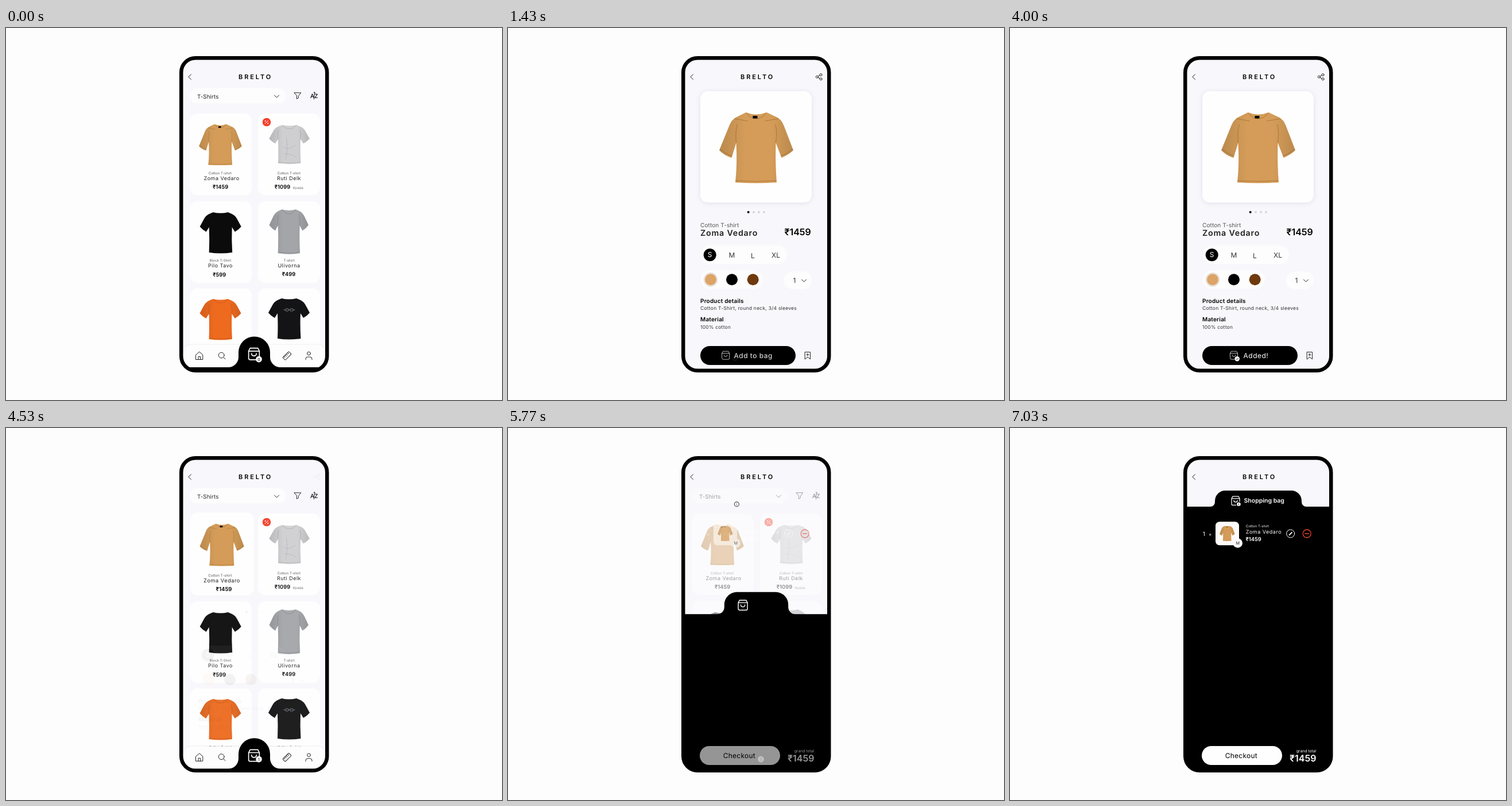
Recreate the animation shown at these times as an HTML page. Size 864 by 648 pixels, loop 8000 ms.

```html
<!DOCTYPE html>
<html lang="en">
<head>
<meta charset="utf-8">
<title>Shop app</title>
<style>
/* --d: product page, --a: added to bag, --b: bag sheet (all 0 to 1) */
@property --d { syntax: "<number>"; inherits: true; initial-value: 0; }
@property --a { syntax: "<number>"; inherits: true; initial-value: 0; }
@property --b { syntax: "<number>"; inherits: true; initial-value: 0; }

html, body { margin: 0; width: 100%; height: 100%; overflow: hidden; background: #fdfdfd; }
svg.stage {
  display: block; width: 100vw; height: 100vh;
  font-family: Inter, "Open Sans", sans-serif;
  text-rendering: geometricPrecision;
  animation: flow 8s linear infinite;
}
@keyframes flow {
  0% { --d: 0; --a: 0; --b: 0; }
  7% { --d: 0; animation-timing-function: linear(0, .097, .298, .514, .7, .839, .933, .989, 1.017, 1.027, 1.028, 1.023, 1.017, 1.011, 1.006, 1.003, 1); }
  17% { --d: 1; }
  17.5% { --a: 0; animation-timing-function: linear(0, .097, .298, .514, .7, .839, .933, .989, 1.017, 1.027, 1.028, 1.023, 1.017, 1.011, 1.006, 1.003, 1); }
  27.5% { --a: 1; }
  53.25% { --d: 1; animation-timing-function: cubic-bezier(.2, .7, .3, 1); }
  58.75% { --d: 0; }
  68.5% { --b: 0; animation-timing-function: ease-in-out; }
  75.1% { --b: 1; }
  100% { --d: 0; --a: 1; --b: 1; }
}

.list { opacity: calc((1 - var(--d)) * (1 - var(--b))); }
.hero { opacity: calc(1 - var(--b)); }
.page { opacity: var(--d); }
.bag { opacity: var(--b); }
.before { opacity: calc(1 - var(--a)); }
.after { opacity: var(--a); }
.nav { transform: translateY(calc(60px * var(--d))); }
.shift { transform: translateX(calc(11.5px * var(--a))); }

.move {
  --p: var(--d);
  transform:
    translate(calc((var(--x) + var(--dx) * var(--p)) * 1px), calc((var(--y) + var(--dy) * var(--p)) * 1px))
    scale(calc(var(--s) + var(--ds) * var(--p)));
}
.move.toBag { --p: var(--b); }

.tile {
  x: calc(320px + 15px * var(--d)); y: calc(149px - 39px * var(--d));
  width: calc(108px + 86px * var(--d)); height: calc(142px + 52px * var(--d));
  rx: 13px;
  filter: drop-shadow(0 1px 5px rgb(80 80 150 / calc(.14 * var(--d))));
}
.heroName { animation: weight 8s step-end infinite; }
@keyframes weight {
  0% { font-weight: 400; }
  7% { font-weight: 600; }
  53.25%, 100% { font-weight: 400; }
}
.sheet { animation: sheet 8s linear infinite; }
@keyframes sheet {
  0%, 68.5% {
    d: path("M300 591 H387 A18 18 0 0 0 405 573 V565 A27.5 27.5 0 0 1 432.5 537.5 H432.5 A27.5 27.5 0 0 1 460 565 V573 A18 18 0 0 0 478 591 H566 V800 H300 Z");
    animation-timing-function: ease-in-out;
  }
  75.1%, 100% {
    d: path("M300 137 H349 A8 8 0 0 0 357 129 V127 A18 18 0 0 1 375 109 H490 A18 18 0 0 1 508 127 V129 A8 8 0 0 0 516 137 H566 V800 H300 Z");
  }
}

.line { fill: none; stroke: #222; stroke-width: 1; stroke-linecap: round; stroke-linejoin: round; }
.white { stroke: #fff; }
.sub { font-size: 6px; letter-spacing: .05px; fill: #555; }
.name { font-size: 9px; letter-spacing: .5px; fill: #222; }
.price { font-size: 9.4px; font-weight: 600; fill: #000; }
.btn { font-size: 12px; letter-spacing: .5px; }
.head { font-size: 10px; font-weight: 600; letter-spacing: .2px; }
.note { font-size: 8.5px; letter-spacing: .25px; fill: #333; }
.size { font-size: 12px; fill: #333; text-anchor: middle; }
.mid { text-anchor: middle; }
.light text { fill: #fff; }
</style>
</head>
<body>
<svg class="stage" viewBox="0 0 864 648">
  <defs>
    <clipPath id="screen"><rect x="305.25" y="52.25" width="254" height="544.5" rx="25"/></clipPath>
    <linearGradient id="shade">
      <stop offset="0" stop-opacity=".12"/>
      <stop offset=".35" stop-opacity="0"/>
      <stop offset=".7" stop-opacity="0"/>
      <stop offset="1" stop-opacity=".12"/>
    </linearGradient>
    <path id="teeShape" d="M-13 0Q0 3 13 0L20 3Q26 6 29 12L36 25Q31 31 25 34L20 26Q19 48 20.500 70Q0 73-20 70Q-19 48-20 26L-25 34Q-31 31-36 25L-29 12Q-26 6-20 3Z"/>
    <g id="tee">
      <use href="#teeShape"/>
      <use href="#teeShape" fill="url(#shade)"/>
      <path d="M-12 .5Q-8 7 0 7T12 .5M-20 26Q-21 15-19 9M20 26Q21 15 19 9M-19 68.500Q0 71 19 68.500" fill="none" stroke="#000" stroke-opacity=".2" stroke-width=".7"/>
    </g>
    <path id="boxyShape" d="M-18-61Q0-54 18-61L37-52Q44-48 48-38L64.500 5Q56 13 44 18L34-8Q33 30 35.500 61Q0 63.500-36.500 61Q-33 30-35-8L-43 18Q-56 14-64.500 5L-47-38Q-43-48-36-52Z"/>
    <g id="boxy">
      <use href="#boxyShape" fill="#d49c58"/>
      <use href="#boxyShape" fill="url(#shade)"/>
      <path d="M-17-60Q-10-50 0-50T17-60M-38-50L-15-46M38-50L15-46M-35-8Q-37-28-33-40M34-8Q37-28 33-40M-36 58Q0 60.500 35 58M-63 3Q-54 11-43 15M63 3Q54 11 43 15" fill="none" stroke="#85541f" stroke-opacity=".5"/>
      <rect x="-6" y="-55" width="8" height="4.500"/>
    </g>
    <path id="bagIcon" d="M-9-4.500L-6.500-9.500H6.500L9-4.500V7Q9 10 6.500 10H-6.500Q-9 10-9 7ZM-9-4.500H9M-4-.5Q-4 3.500 0 3.500T4-.5"/>
    <rect id="card" width="108" height="142" rx="13" fill="#fefefe"/>
  </defs>

  <rect width="864" height="648" fill="#fdfdfd"/>
  <g clip-path="url(#screen)">
    <rect x="302" y="49" width="261" height="551" fill="#f8f8fc"/>

    <g class="list">
      <rect x="319" y="105" width="169" height="26" rx="13" fill="#fdfdfe"/>
      <text x="333" y="122.500" font-size="9.800" letter-spacing=".1" fill="#222">T-Shirts</text>
      <path class="line" d="M467.500 117.200L471.500 121L475.500 117.200M502.200 112.800H513.800L509.500 118.300V121.800L506.500 123.500V118.300Z"/>
      <text x="530" y="122" font-size="10" font-weight="500">A</text>
      <text x="537" y="122" font-size="10" font-weight="500">Z</text>
      <path class="line" d="M537.500 112.500L536.500 124M536 112.500L537.500 111.500L538.500 113" stroke-width=".7"/>

      <use href="#card" x="439" y="149"/>
      <use href="#card" x="320" y="302"/>
      <use href="#card" x="439" y="302"/>
      <use href="#card" x="320" y="453.500"/>
      <use href="#card" x="439" y="453.500"/>

      <use href="#tee" transform="translate(493.500 169)scale(.98 .95)" fill="#cfcfd1"/>
      <path d="M482 207Q490 214 505 204M484 219Q496 218 506 226M488 190Q492 205 487 230" fill="none" stroke="#999" stroke-opacity=".45" stroke-width=".8"/>
      <use href="#tee" transform="translate(373.700 321)" fill="#0b0b0c"/>
      <use href="#tee" transform="translate(492.700 316)scale(.95 1.090)" fill="#a3a5a9"/>
      <use href="#tee" transform="translate(373.500 472)" fill="#ee6a1f"/>
      <use href="#tee" transform="translate(493 471)" fill="#141416"/>
      <g fill="none" stroke="#8d98a3" stroke-width=".8">
        <rect x="487" y="489" width="5" height="4" rx="1"/>
        <rect x="495" y="489" width="5" height="4" rx="1"/>
        <path d="M483.500 491H487M492 491H495M500 491H503.500"/>
      </g>

      <g class="mid">
        <text class="sub" x="493" y="254.500">Cotton T-shirt</text>
        <text class="name" x="493" y="264.500">Ruti Delk</text>
        <text class="price" x="481.500" y="280">₹1099</text>
        <text x="508.700" y="281" font-size="6" fill="#999">₹2499</text>
        <path d="M499.500 279H518" stroke="#999" stroke-width=".7"/>
        <text class="sub" x="373.500" y="406.500">Block T-Shirt</text>
        <text class="name" x="373.500" y="416.500">Pilo Tavo</text>
        <text class="price" x="371.700" y="433">₹599</text>
        <text class="sub" x="493" y="406.500">T-shirt</text>
        <text class="name" x="493" y="416.500">Ulivorna</text>
        <text class="price" x="492.500" y="432">₹499</text>
        <text class="sub" x="373.500" y="558">Cotton T-shirt</text>
        <text class="name" x="373.500" y="568.500">Zoma Vedaro</text>
        <text class="price" x="374" y="584">₹1459</text>
        <text class="sub" x="493" y="558">Cotton T-shirt</text>
        <text class="name" x="493" y="568.500">Zoma Vedaro</text>
        <text class="price" x="493" y="584">₹1459</text>
      </g>
    </g>

    <g class="hero">
      <rect class="tile" fill="#fefefe"/>
      <g class="move" style="--x:373.5;--y:203;--dx:59;--dy:5;--s:.58;--ds:.42"><use href="#boxy"/></g>
      <g class="move" style="--x:353;--y:254.5;--dx:-18;--dy:92;--s:1;--ds:.68"><text class="sub">Cotton T-shirt</text></g>
      <g class="move" style="--x:344.5;--y:264.5;--dx:-9.5;--dy:97.5;--s:1;--ds:.58"><text class="name heroName">Zoma Vedaro</text></g>
      <g class="move" style="--x:360;--y:280;--dx:121.5;--dy:80.5;--s:1;--ds:.7"><text class="price">₹1459</text></g>
    </g>

    <g class="list">
      <circle cx="454" cy="164" r="7.300" fill="#f6402d"/>
      <path class="line white" d="M451.500 166.500L456.500 161.500"/>
      <circle cx="451.800" cy="162" r="1" fill="#fff"/>
      <circle cx="456.200" cy="166" r="1" fill="#fff"/>
    </g>

    <g class="page">
      <path class="line" d="M540 84L543.200 82.300M540 86.300L543.200 88"/>
      <g class="line">
        <circle cx="538.300" cy="85.200" r="2"/>
        <circle cx="545" cy="81.500" r="2"/>
        <circle cx="545" cy="88.800" r="2"/>
      </g>
      <circle cx="418.700" cy="320.800" r="2"/>
      <g fill="#d6d6da">
        <circle cx="428" cy="320.800" r="2"/>
        <circle cx="437" cy="320.800" r="2"/>
        <circle cx="446" cy="320.800" r="2"/>
      </g>

      <g fill="#fdfdfe">
        <rect x="336" y="379" width="150" height="32" rx="16"/>
        <rect x="336" y="422.500" width="108" height="32" rx="16"/>
        <rect x="481" y="424" width="48" height="31" rx="15.500"/>
      </g>
      <circle cx="351.700" cy="395.200" r="11"/>
      <text class="size" x="351.700" y="399.400" style="fill:#fff">S</text>
      <text class="size" x="390" y="400">M</text>
      <text class="size" x="426.500" y="400.500">L</text>
      <text class="size" x="466.500" y="400">XL</text>
      <circle cx="353" cy="438.300" r="12.500" fill="#e9e4e0"/>
      <circle cx="353" cy="438.300" r="10" fill="#dda468"/>
      <circle cx="390" cy="438.300" r="10"/>
      <circle cx="426.700" cy="438.300" r="10" fill="#6f3a0e"/>
      <text class="size" x="499" y="444.300">1</text>
      <path class="line" d="M511.500 438.300L515.500 442L519.500 438.300"/>

      <text class="head" x="335" y="478.500">Product details</text>
      <text class="note" x="335" y="491">Cotton T-Shirt, round neck, 3/4 sleeves</text>
      <text class="head" x="335" y="511">Material</text>
      <text class="note" x="335" y="523.500">100% cotton</text>

      <rect x="335" y="554" width="166" height="33" rx="16.500"/>
      <g class="shift">
        <use href="#bagIcon" class="line white" transform="translate(378.500 570)scale(.72)" stroke-width="1.200"/>
      </g>
      <text class="btn before" x="393.500" y="574.800" fill="#fff">Add to bag</text>
      <g class="after">
        <text class="btn" x="406.500" y="574.800" fill="#fff">Added!</text>
        <circle cx="395.700" cy="576.300" r="4.200" fill="#fff"/>
        <path class="line" d="M393.900 576.400L395.200 577.700L397.500 575.200"/>
      </g>
      <path class="line" d="M517.500 564.500H526.500V576.800L522 573.200L517.500 576.800ZM522 567V571M520 569H524"/>
    </g>

    <path class="line" d="M322.500 80.800L317.800 85.200L322.500 89.600"/>
    <text x="405" y="89.300" font-size="11" font-weight="600" letter-spacing="2.900">BRELTO</text>

    <g class="nav">
      <rect x="308" y="552" width="249" height="60" rx="15" fill="#fdfdfe" style="filter:drop-shadow(0 -1px 1px rgb(80 80 150/.08))"/>
      <path class="line" d="M330.800 569.300L336.800 564L342.800 569.300V577.500H330.800ZM335 577.500V572.500H338.700V577.500M378.800 573.500L382 576.800M522 577.800V576.500Q522 573 525.500 573H529.500Q533 573 533 576.500V577.800"/>
      <circle class="line" cx="375.200" cy="570" r="4.900"/>
      <circle class="line" cx="527.500" cy="567" r="2.900"/>
      <g class="line" transform="translate(489.500 571)rotate(-45)">
        <rect x="-7.500" y="-3.200" width="15" height="6.400" rx=".8"/>
        <path d="M-4.500-3V-.5M-1.500-3V-.5M1.500-3V-.5M4.500-3V-.5"/>
      </g>
      <path class="sheet"/>
      <g class="move toBag" style="--x:432;--y:567.5;--dx:-39;--dy:-441;--s:1.04;--ds:-.26">
        <use href="#bagIcon" class="line white" style="stroke-width:1.6px"/>
      </g>
    </g>

    <g class="list mid">
      <circle cx="440.500" cy="577" r="5.400" fill="#fff"/>
      <text class="before" x="440.500" y="579.500" font-size="7">0</text>
      <text class="after" x="440.500" y="579.500" font-size="7">1</text>
    </g>

    <g class="bag">
      <circle cx="398.400" cy="132.800" r="4" fill="#fff" stroke="#000" stroke-width="1.400"/>
      <text class="mid" x="398.400" y="134.600" font-size="5" font-weight="600">1</text>
      <g class="light">
        <text x="407.500" y="130.400" font-size="10.500" font-weight="600">Shopping bag</text>
        <text class="mid" x="337.800" y="188" font-size="10">1</text>
        <text class="mid" x="348.700" y="187.500" font-size="8">×</text>
        <text class="sub" x="411" y="173">Cotton T-shirt</text>
        <text class="name" x="410.800" y="183.500">Zoma Vedaro</text>
        <text class="price" x="410.500" y="197">₹1459</text>
      </g>
      <rect x="358" y="163.300" width="41" height="41" rx="7" fill="#fdfaf7"/>
      <use href="#boxy" transform="translate(378.300 183.500)scale(.205 .215)"/>
      <circle cx="396.700" cy="200.500" r="8.300" fill="#fafafc"/>
      <text class="mid" x="396.700" y="203.100" font-size="7.200" fill="#222">M</text>
      <circle class="line white" cx="488.700" cy="184" r="7"/>
      <path d="M486.500 186.300L491 181.800" stroke="#fff" stroke-width="1.700" stroke-linecap="round"/>
      <g fill="none" stroke="#e8432d" stroke-width="1.300" stroke-linecap="round">
        <circle cx="517.200" cy="184" r="7"/>
        <path d="M513.700 184H520.700"/>
      </g>
      <rect x="334" y="554" width="140" height="33" rx="16.500" fill="#fefefe"/>
      <text x="374.700" y="574.800" font-size="12" letter-spacing=".25">Checkout</text>
      <g class="light" text-anchor="end">
        <text x="533.300" y="564.500" font-size="6.800">grand total</text>
        <text x="533.500" y="581" font-size="16" font-weight="600">₹1459</text>
      </g>
    </g>
  </g>
  <rect x="305.250" y="52.250" width="254" height="544.500" rx="25" fill="none" stroke="#000" stroke-width="6.500"/>
</svg>
</body>
</html>
```
